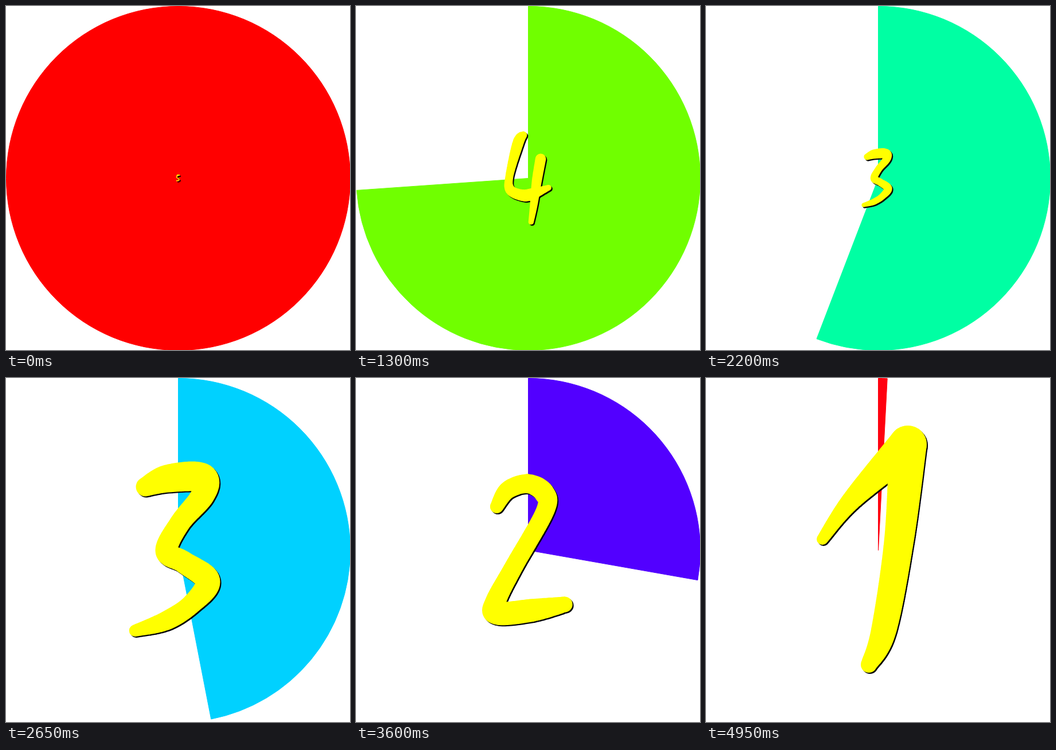
An HTML page with a canvas that plays this animation: 600 by 600 pixels, repeating every 5000 ms.

```html
<!DOCTYPE html>
<html lang="en">
<head>
<meta charset="utf-8">
<title>Countdown</title>
<style>
  html, body { margin: 0; width: 100%; height: 100%; overflow: hidden; background: #fff; }
  canvas { display: block; }
</style>
</head>
<body>
<canvas id="stage" width="600" height="600"></canvas>
<script>
const ctx = document.getElementById('stage').getContext('2d');
const SIZE = 600;
const CENTER = SIZE / 2;
const STEP_MS = 50;
const STEPS = 100;
const STEPS_PER_DIGIT = 20;
const SHADOW = 2;
const SAMPLES = 40;

// Brush strokes of each digit: key points [x, y, radius] around the centre at full size.
const DIGITS = {
  5: [brush([95, -180, 20], [10, -168, 34], [-53, -152, 34], [-86, -80, 23], [-80, -32, 25],
            [62, 80, 26], [66, 122, 27], [5, 162, 29], [-58, 176, 24], [-106, 176, 16])],
  4: [brush([-24, -224, 19], [-51, -185, 29], [-97, -9, 21], [-92, 62, 26], [-30, 90, 30],
            [18, 84, 30], [107, 51, 15]),
      brush([66, -99, 28], [46, 15, 26], [30, 140, 20], [16, 229, 14])],
  3: [brush([-82, -159, 24], [-25, -180, 35], [60, -182, 37], [62, -138, 30], [5, -68, 26],
            [-29, 2, 28], [15, 31, 28], [75, 78, 31], [34, 136, 25], [-30, 178, 24], [-108, 203, 15])],
  2: [brush([-85, -118, 18], [-55, -163, 24], [0, -180, 26], [44, -155, 28], [46, -105, 25],
            [-40, 48, 25], [-88, 140, 28], [-84, 172, 31], [10, 164, 31], [100, 148, 21])],
  1: [brush([-97, -19, 10], [-46, -87, 17], [52, -184, 33]),
      brush([52, -184, 33], [37, -20, 26], [10, 140, 22], [-16, 200, 14])]
};

function catmullRom(p0, p1, p2, p3, t) {
  return p1 + t / 2 * (p2 - p0 + t * (2 * p0 - 5 * p1 + 4 * p2 - p3
    + t * (3 * (p1 - p2) + p3 - p0)));
}

// Sweeps a round brush of changing radius along a smooth curve.
function brush(...points) {
  const path = new Path2D();
  const point = i => points[Math.max(0, Math.min(points.length - 1, i))];
  for (let i = 0; i < points.length - 1; i++) {
    for (let s = 0; s <= SAMPLES; s++) {
      const [x, y, radius] = [0, 1, 2].map(axis => catmullRom(
        point(i - 1)[axis], point(i)[axis], point(i + 1)[axis], point(i + 2)[axis], s / SAMPLES));
      path.moveTo(x + radius, y);
      path.arc(x, y, radius, 0, 2 * Math.PI);
    }
  }
  return path;
}

function drawWedge(progress) {
  const degrees = Math.floor(360 * (1 - progress));
  const middle = CENTER + 0.5;
  ctx.fillStyle = ctx.strokeStyle = `hsl(${360 * progress}, 100%, 50%)`;
  ctx.lineWidth = 1;
  ctx.lineJoin = 'round';
  ctx.beginPath();
  ctx.moveTo(middle, middle);
  ctx.arc(middle, middle, CENTER, -Math.PI / 2, (degrees - 90) * Math.PI / 180);
  ctx.closePath();
  ctx.fill();
  ctx.stroke();
}

function drawDigit(value, step) {
  const scale = (step + 0.54) / (STEPS_PER_DIGIT - 0.46);
  for (const [color, shift] of [['#000', SHADOW], ['#ff0', 0]]) {
    ctx.save();
    ctx.translate(CENTER + shift, CENTER + shift);
    ctx.scale(scale, scale);
    ctx.fillStyle = color;
    DIGITS[value].forEach(stroke => ctx.fill(stroke));
    ctx.restore();
  }
}

function render(time) {
  const step = Math.floor(time / STEP_MS) % STEPS;
  ctx.fillStyle = '#fff';
  ctx.fillRect(0, 0, SIZE, SIZE);
  drawWedge(step / STEPS);
  drawDigit(5 - Math.floor(step / STEPS_PER_DIGIT), step % STEPS_PER_DIGIT);
}

const start = performance.now();
function tick() {
  render(performance.now() - start);
  requestAnimationFrame(tick);
}
tick();
</script>
</body>
</html>
```
